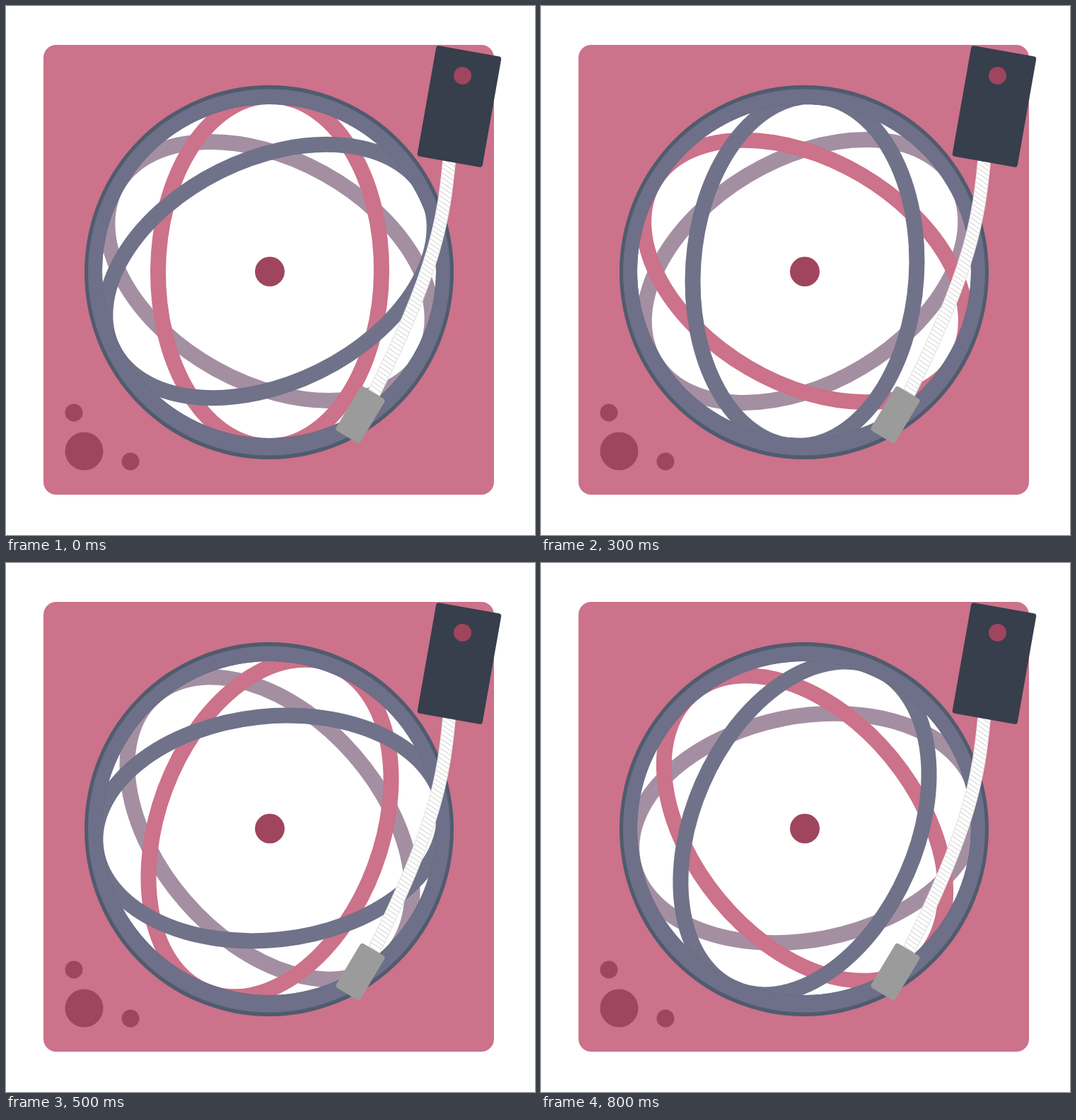
Animation, 748 px wide and 748 px high, one loop 0.9 s. Source, as an HTML page with a canvas:

```html
<!DOCTYPE html>
<html lang="en">
<head>
<meta charset="utf-8">
<title>Turntable</title>
<style>
  html, body { margin: 0; width: 100%; height: 100%; overflow: hidden; background: #fff; }
  canvas { display: block; width: 100vw; height: 100vh; }
</style>
</head>
<body>
<canvas id="stage" width="748" height="748"></canvas>
<script>
const ctx = document.getElementById('stage').getContext('2d');
const STEP_MS = 100;
const STEPS = 9;
const COLOR = {
  pink: '#cc728a', mauve: '#a48fa2', slate: '#707289', ring: '#6e6f88',
  rim: '#505b6e', maroon: '#a0455e', head: '#373e4c', grey: '#9b9b9b'
};
// Bottom to top; angles in degrees from vertical.
const loops = [
  { color: COLOR.mauve, angle: -61 },
  { color: COLOR.pink, angle: 0.5 },
  { color: COLOR.slate, angle: 63.7 }
];
const rad = deg => deg * Math.PI / 180;

function ellipse(x, y, rx, ry, color) {
  ctx.fillStyle = color;
  ctx.beginPath();
  ctx.ellipse(x, y, rx, ry, 0, 0, Math.PI * 2);
  ctx.fill();
}

function dot(x, y, r) {
  ellipse(x, y, r, r, COLOR.maroon);
}

function box(x, y, w, h, r, deg, color) {
  ctx.save();
  ctx.translate(x, y);
  ctx.rotate(rad(deg));
  ctx.fillStyle = color;
  ctx.beginPath();
  ctx.roundRect(-w / 2, -h / 2, w, h, r);
  ctx.fill();
  ctx.restore();
}

function makeHatch() {
  const tile = document.createElement('canvas');
  tile.width = 10;
  tile.height = 7;
  const t = tile.getContext('2d');
  t.fillStyle = '#fff';
  t.fillRect(0, 0, 10, 7);
  t.strokeStyle = '#cbcbcb';
  t.beginPath();
  for (const dy of [-7, 0, 7]) {
    t.moveTo(-10, dy - 7);
    t.lineTo(20, dy + 14);
  }
  t.stroke();
  return ctx.createPattern(tile, 'repeat');
}
const hatch = makeHatch();

function drawLoop({ color, angle }, turn) {
  ctx.strokeStyle = color;
  ctx.lineWidth = 22;
  ctx.beginPath();
  ctx.ellipse(373, 375, 158, 247.5, rad(angle + turn), 0, Math.PI * 2);
  ctx.stroke();
}

function drawRing() {
  const band = (x, y, rx, ry, color) => {
    ctx.fillStyle = color;
    ctx.beginPath();
    ctx.ellipse(x, y, rx, ry, 0, 0, Math.PI * 2);
    ctx.moveTo(608, 375);
    ctx.arc(372, 375, 236, 0, Math.PI * 2);
    ctx.fill('evenodd');
  };
  band(372, 376.5, 261, 264.5, COLOR.rim);
  band(372, 376.5, 256, 259, COLOR.ring);
}

function drawArm() {
  const arm = new Path2D('M627 215 C619 302 608 372 519 550');
  ctx.strokeStyle = '#e0e0e0';
  ctx.lineWidth = 19;
  ctx.stroke(arm);
  ctx.strokeStyle = hatch;
  ctx.lineWidth = 17;
  ctx.stroke(arm);
  box(641, 142, 93.5, 159, 4, 10, COLOR.head);
  dot(645.5, 98.5, 12.5);
  box(501, 578, 40, 73, 4, 31, COLOR.grey);
}

function draw(now) {
  const step = Math.floor(now / STEP_MS) % STEPS;
  const turn = step * 360 / STEPS;
  ctx.fillStyle = '#fff';
  ctx.fillRect(0, 0, 748, 748);
  box(371.5, 373, 637, 636, 18, 0, COLOR.pink);
  dot(96, 575, 12.5);
  dot(110.5, 629.5, 27);
  dot(176, 644, 12.5);
  ellipse(372, 375, 237, 237, '#fff');
  loops.forEach(loop => drawLoop(loop, turn));
  drawRing();
  dot(373, 375.5, 21);
  drawArm();
}

const start = performance.now();
function tick() {
  draw(performance.now() - start);
  requestAnimationFrame(tick);
}
tick();
</script>
</body>
</html>
```
